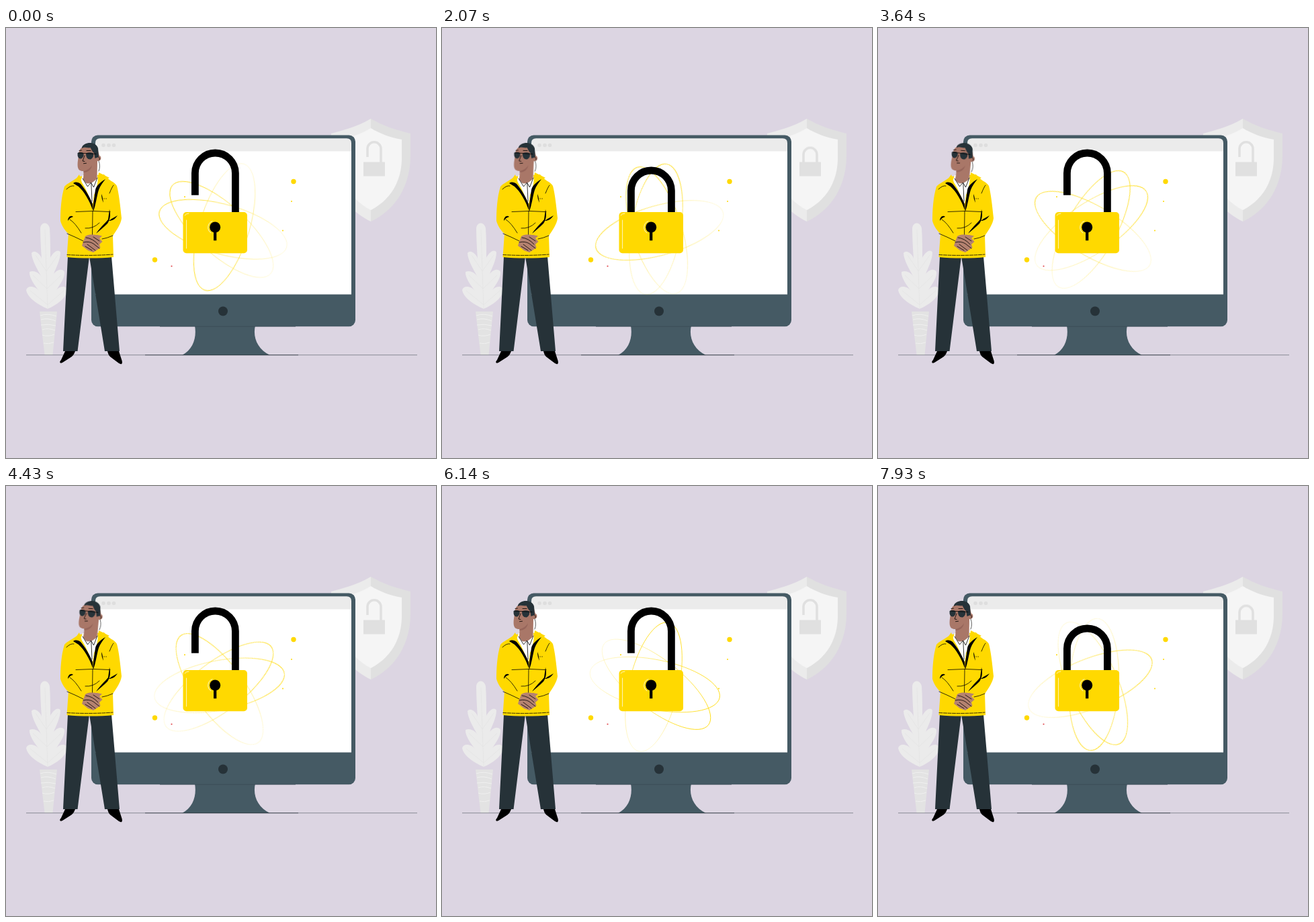
Recreate the animation shown at these times as an HTML page. Size 640 by 640 pixels, loop 8 s.

```html
<!DOCTYPE html>
<html lang="en">
<head>
<meta charset="utf-8">
<title>Guarded screen</title>
<style>
  html, body { margin: 0; width: 100%; height: 100%; overflow: hidden; background: #dcd5e2; }
  svg { display: block; width: 100vw; height: 100vh; }

  .orbits, .shackle, .head { animation: 8s infinite; }
  .orbits { animation-name: spin; transform-origin: 320px 297.5px; }
  .shackle { animation-name: latch; }
  .shackle.big { --drop: 26px; }
  .shackle.small { --drop: 8.5px; }
  .head { animation-name: look; transform-origin: 125px 228px; }

  /* short hold, then an even turn at about 14 steps a second */
  @keyframes spin {
    0%, 2.6% { transform: rotate(4.15deg); }
    2.61% { transform: rotate(6.2deg); animation-timing-function: steps(109, end); }
    100% { transform: rotate(237.2deg); }
  }
  @keyframes latch {
    0% { transform: none; animation-timing-function: ease-in-out; }
    18.75%, 32.5% { transform: translateY(var(--drop)); animation-timing-function: ease-in-out; }
    45.5%, 78.75% { transform: none; animation-timing-function: ease-in-out; }
    97.5%, 100% { transform: translateY(var(--drop)); }
  }
  @keyframes look {
    0%, 15% { transform: none; animation-timing-function: ease-in-out; }
    45.6%, 48.75% { transform: rotate(4.5deg); animation-timing-function: ease-in-out; }
    77.5%, 100% { transform: none; }
  }

  .line { fill: none; stroke: #000; stroke-width: .8; stroke-linecap: round; stroke-linejoin: round; }
  .gold { fill: #ffd900; }
  .skin { fill: #a97768; }
  .navy { fill: #263238; }
</style>
</head>
<body>
<svg viewBox="0 0 640 640">
  <defs>
    <linearGradient id="fade">
      <stop offset="0" stop-color="#ffd900" stop-opacity=".15"/>
      <stop offset=".5" stop-color="#ffd900" stop-opacity=".55"/>
      <stop offset="1" stop-color="#ffd900" stop-opacity=".95"/>
    </linearGradient>
  </defs>
  <rect width="640" height="640" fill="#dcd5e2"/>

  <!-- shield -->
  <path fill="#ebebeb" d="M543 135C526 145 505 152 484 157V190C484 236 507 271 543 288Z"/>
  <path fill="#e0e0e0" d="M543 135C560 145 580 152 602 157V190C602 236 579 271 543 288Z"/>
  <path fill="#f5f5f5" d="M543 149C556 157 572 163 589 166V190C590 228 572 256 543 271C514 256 496 228 497 190V166C514 163 530 157 543 149Z"/>
  <path class="shackle small" fill="none" stroke="#e0e0e0" stroke-width="3.6" d="M538 192V179.8A10 10 0 0 1 558 179.8V200"/>
  <rect x="532" y="199.5" width="32" height="21" fill="#e0e0e0"/>

  <!-- plant -->
  <path fill="#ebebeb" d="M62 418C48 412 32 402 30 390C32 382 44 384 50 392C42 383 34 370 35 363C43 359 52 367 54 372C48 362 38 345 38 335C42 329 51 336 53 343C52 330 51 310 51 298C52 288 63 288 65 298C66 312 66 328 66 342C70 334 78 328 81 334C81 345 74 358 71 366C75 360 84 357 87 363C88 372 80 382 75 390C80 384 90 383 91 390C90 402 76 412 62 418Z"/>
  <path fill="none" stroke="#e2e2e2" stroke-width=".7" d="M58 300L62 418M44 338L60 362L77 338M40 368L61 388L82 368M36 391L62 412L86 391"/>
  <path fill="#e3e3e3" d="M50 422H76L69.5 486.5H57.5Z"/>
  <path fill="none" stroke="#f0f0f0" stroke-width="1" d="M51 428Q62 424 75 429M52 434Q63 431 74 436M52 442Q63 440 74 443M54 449Q63 446 73 450M54 457Q63 460 72 456M56 469Q63 471 71 468"/>

  <path stroke="#263238" stroke-width=".6" stroke-opacity=".75" d="M30 486.7H612"/>

  <!-- monitor -->
  <path fill="#455a64" d="M281 443C284 460 279 478 262 487H393C374 478 367 460 371 443Z"/>
  <path stroke="#263238" stroke-width=".7" d="M207 486.7H435"/>
  <rect x="127" y="159.5" width="393" height="284.7" rx="9.5" fill="#455a64"/>
  <path stroke="#37474f" stroke-width=".7" d="M229 444.2H431"/>
  <path fill="#fff" d="M133 183H514V396.5H133Z"/>
  <path fill="#ebebeb" d="M133 183.5V171Q133 164.3 140 164.3H507Q514 164.3 514 171V183.5Z"/>
  <g fill="#dedede">
    <circle cx="145" cy="174.5" r="2.8"/><circle cx="153" cy="174.5" r="2.8"/><circle cx="160.5" cy="174.5" r="2.8"/>
  </g>
  <circle class="navy" cx="323" cy="421.5" r="7"/>

  <!-- particles and orbits -->
  <g class="gold">
    <circle cx="428" cy="228.5" r="3.7"/><circle cx="221.5" cy="345" r="3.7"/>
    <circle cx="425" cy="258" r="1"/><circle cx="412" cy="301.5" r="1"/><circle cx="266" cy="251.3" r="1"/>
  </g>
  <circle cx="246.5" cy="354.5" r="1.1" fill="#e0484d"/>
  <g class="orbits" fill="none" stroke="url(#fade)" stroke-width=".9">
    <ellipse rx="98.3" ry="37" transform="translate(320 297.5) rotate(191.5) translate(-3.5 -1.3)"/>
    <ellipse rx="98.3" ry="37" transform="translate(320 297.5) rotate(218) translate(-2.2 -1.2)"/>
    <ellipse rx="98.3" ry="37" transform="translate(320 297.5) rotate(103) translate(-2.6 -4.5)"/>
  </g>

  <!-- padlock -->
  <path class="shackle big" fill="none" stroke="#000" stroke-width="10.8" d="M281.4 248.7V216A30 30 0 0 1 341.4 216V300"/>
  <rect class="gold" x="263.5" y="274" width="95.5" height="61.3" rx="5"/>
  <path fill="none" stroke="#fff" stroke-width=".9" stroke-linecap="round" d="M268.6 286V328M266 279Q268 276 272 276M307 287.5A10 10 0 0 0 305 305" opacity=".85"/>
  <circle cx="311.2" cy="296.5" r="8"/>
  <path d="M309 300H313.3V316.3H309Z"/>

  <!-- guard: legs and shoes -->
  <path class="navy" d="M92 340H124L106.5 481H85ZM124 340H157L169 481H147Z"/>
  <path d="M88 481H103C101 486 99 489 95 491L84 498C80 500 79 497 82 494Z"/>
  <path d="M151 481H168L172.5 495C174 501 171 501 168 499L156 490C153 488 152 485 151 481Z"/>

  <!-- jacket -->
  <path class="gold" d="M108 221C100 228 91 231 87 236C82 252 81 272 81 287C83 295 89 303 93 306L90.5 341C110 343 140 343 160 341L159 309C164 302 171 292 172 283C170 264 168 246 165 235C162 229 152 227 146 218Z"/>
  <path fill="#fff" d="M114 219L111 228L128 264L137 232L136 219Z"/>

  <!-- head -->
  <g class="head">
    <path class="skin" d="M114 177C108 181 108 187 107.500 194C106 203 106 210 110 212C112 213 114 213 115.500 213C115.500 219 115 224 114.500 227C120 234 127 233 135.500 224L136 198C142 199 143 191 139 190L136 179Z"/>
    <path d="M115.500 213C121 212 126 208 128 204C127 211 122 215 115.500 215Z" fill="#96655a"/>
    <path class="navy" d="M113 177.500C116 169 134 168 137 179L138 192L132.500 194L131 186C128 184 127 180 125.500 178C121 179 117 176 113 179Z"/>
    <path class="navy" d="M106.500 186Q112 184 115.500 186.500Q116.500 192 112 194.500Q106 195.500 106.500 186ZM119 186.500Q125 184 130 186.500Q131 193 126 195.500Q118.500 196 119 186.500Z"/>
    <path class="line" stroke="#263238" d="M108 186L134 187.500"/>
    <path class="line" stroke="#263238" stroke-width=".9" d="M109 182.500L112.500 182M120 182.500L126 182.500M115.500 201.700L119.500 201.300"/>
    <path class="line" stroke="#7d5147" stroke-width=".5" d="M117 190L114 198L117 198.500M138 192.500Q140 192 139 196"/>
    <path class="line" stroke="#fff" stroke-width=".8" d="M138 198Q141 206 138 213" opacity=".8"/>
  </g>

  <!-- collar and seams -->
  <path fill="#fff" d="M113.500 223L122 235L126.500 230L131 236L136 222L137.500 230L128 264L111 230Z"/>
  <path class="line" stroke-width=".6" d="M114 224L121.500 236L126.500 230L130.500 237L136 223M126.800 231L128 258"/>
  <path class="gold" d="M109 218L100.500 230L112 234L128 264C124 249 118 238 113 230ZM138 215L154 223L141 229L131 248L129 262L136 232Z"/>
  <path d="M100 231C104 228 108 230 111 232C118 240 125 252 129 262L129.500 272C124 256 116 243 108 236Z"/>
  <path d="M148 225C141 229 134 235 133 241L130 262L129.500 274C134 263 135 250 138 241C140 235 144 230 148 225Z"/>
  <path class="line" d="M129 273L128.500 308M104 273.500Q130 271.500 155 273.500M118 298Q130 299 139 290M90 240Q96 234 101 235M154 246Q158 236 160 234M95 285Q103 290 112 305M91 306Q103 311 115 317M159 309Q150 313 143 314" stroke-width=".7"/>
  <path d="M92 287C92 281 97 278 100 281C96 282 94 284 92 287ZM154 270C156 278 155 285 151 291C146 296 140 301 134 306C140 297 148 290 152 285ZM142 247C142 252 143 256 145 260C144 255 144 251 142 247ZM153 287C158 283 163 281 166 279C162 285 158 287 153 287Z"/>
  <path class="line" stroke-width=".7" stroke-dasharray="5 1.500" d="M91 337.500Q125 339.500 159 337"/>
  <path class="line" stroke="#fff" stroke-width="1.500" stroke-dasharray="1 2" d="M145.500 254H151.500" opacity=".8"/>

  <!-- hands -->
  <path fill="#b58270" d="M118 310C124 306 131 308 136 308L143 309.500L139 313L143.500 318L139 322L140.500 327L130 334L122 331L113 324L115 318Z"/>
  <path class="line" stroke="#7d5147" stroke-width=".6" d="M115 319Q124 317 130 321L139 328M119 312Q129 313 137 322M118 325L128 331M121 322L133 331M130 311L139 317"/>
</svg>
</body>
</html>
```
